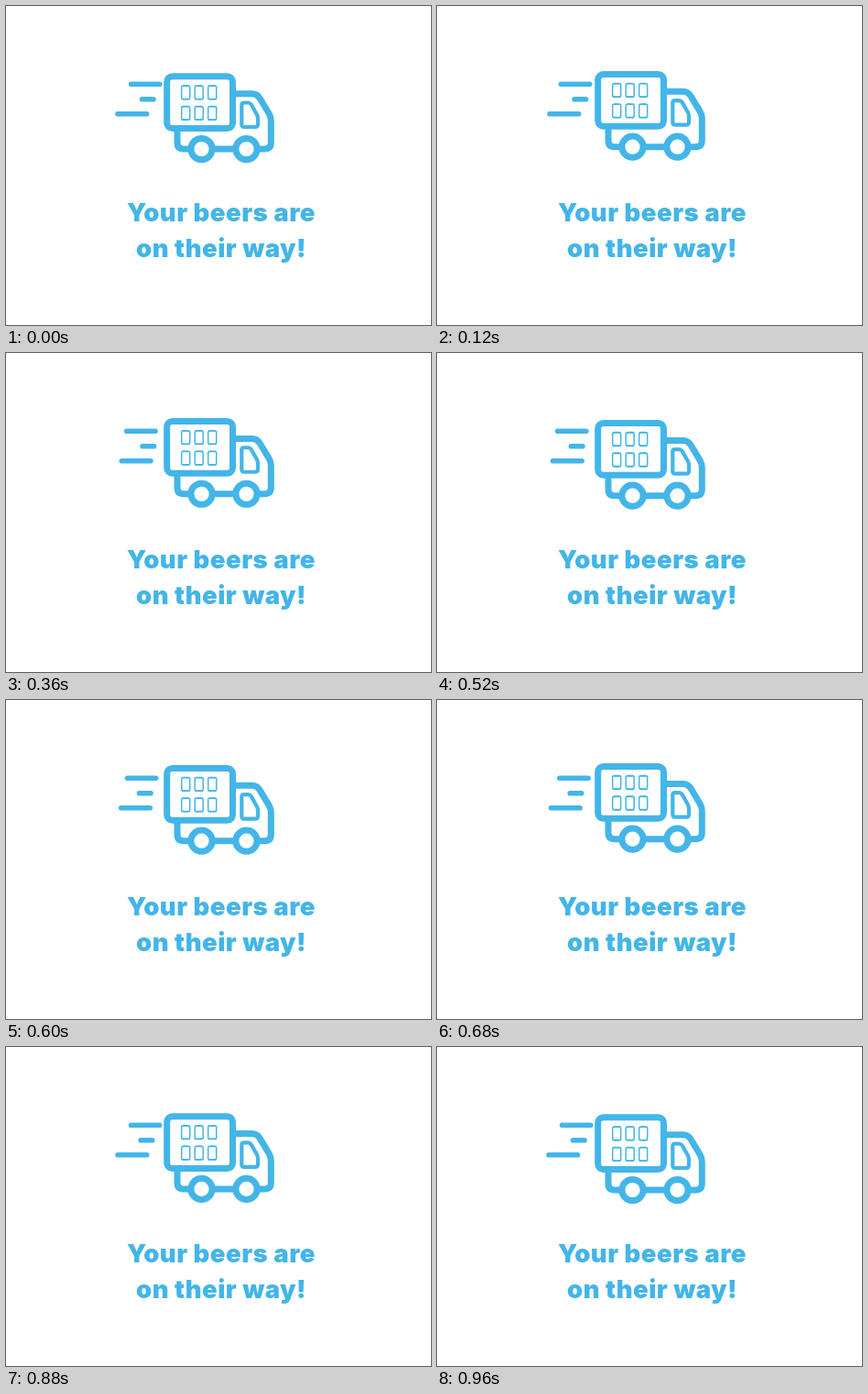
Animation, 464 px wide and 348 px high, one loop 980 ms. Source, as an HTML page:

```html
<!DOCTYPE html>
<html lang="en">
<head>
<meta charset="utf-8">
<title>On the way</title>
<style>
  html, body { margin: 0; width: 100%; height: 100%; overflow: hidden; background: #fff; }
  svg { display: block; width: 464px; height: 348px; }
  .ink { fill: none; stroke: #43b5e8; stroke-width: 7; stroke-linecap: round; stroke-linejoin: round; }
  .wind { stroke-width: 5.6; }
  .window { stroke-width: 4.2; }
  .can { stroke-width: 1.5; }
  text { font: 900 27.5px Inter, "Open Sans", sans-serif; letter-spacing: .5px; fill: #43b5e8; text-anchor: middle; }
</style>
</head>
<body>
<svg viewBox="0 0 464 348">
  <defs>
    <g id="can" class="can">
      <rect x=".7" y=".9" width="9" height="14.8" rx="1.8"/>
      <path d="M2 1.2H8.4M2 15.4H8.4"/>
    </g>
  </defs>
  <g class="ink wind">
    <path id="top" d="M136.6 85.3H167.8"/>
    <path id="mid" d="M148.5 101.8H161"/>
    <path id="low" d="M122 117.8H153.6"/>
  </g>
  <g id="truck" class="ink">
    <rect x="175.7" y="76.8" width="71.8" height="56.8" rx="6"/>
    <path d="M187 135V149Q187 156 194 156H199M227 156H249M276 156H282Q289.3 156 289.3 149V125Q289.3 121 287.2 117.5L277 100.5Q274 95.7 269 95.7H250"/>
    <path class="window" d="M259.5 105.5H264Q266.5 105.5 268 108L274 118.5Q275 120.5 275 123V129Q275 132 272 132H260Q257.3 132 257.3 129V108Q257.3 105.5 259.5 105.5Z"/>
    <circle cx="213.5" cy="156" r="11.6"/>
    <circle cx="262.5" cy="156" r="11.6"/>
    <g id="cans"></g>
  </g>
  <text x="235" y="235">Your beers are</text>
  <text x="235" y="274">on their way!</text>
</svg>
<script>
  const LOOP = 980, CYCLE = 960; // short rest at the end of each loop
  const { sin, cos, PI } = Math;
  const $ = id => document.getElementById(id);
  const shift = (id, x, y = 0) => $(id).setAttribute("transform", `translate(${x} ${y})`);

  for (let i = 0; i < 6; i++) {
    const can = document.createElementNS("http://www.w3.org/2000/svg", "use");
    can.setAttribute("href", "#can");
    can.setAttribute("x", 191 + 14.5 * (i % 3));
    can.setAttribute("y", 86 + 22.5 * Math.floor(i / 3));
    $("cans").append(can);
  }

  function draw(now) {
    const a = 2 * PI * Math.min(now % LOOP, CYCLE) / CYCLE;
    // Starts at rest; the sine part moves the turning points.
    const sway = (swing, skew) => swing * (1 - cos(a)) + skew * sin(a);

    shift("truck", 0, -2.3 * (1 - cos(2 * a)));
    shift("top", sway(-2.6, -0.5));
    shift("mid", sway(-0.7, 2.5));
    shift("low", sway(2.35, 0.45));
  }

  const start = performance.now();
  function tick() {
    draw(performance.now() - start);
    requestAnimationFrame(tick);
  }
  tick();
</script>
</body>
</html>
```
